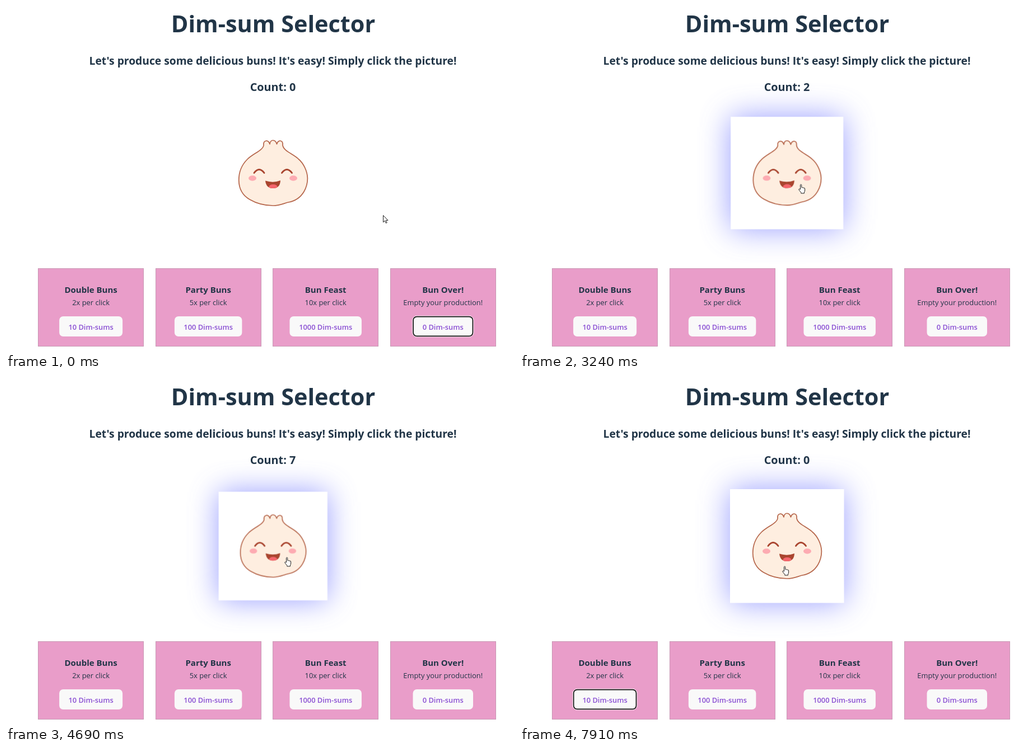
These frames come from a looping animation (907x617 px, 8000 ms). An HTML page:

```html
<!DOCTYPE html>
<html lang="en">
<head>
<meta charset="utf-8">
<title>Dim-sum Selector</title>
<style>
  html, body { margin: 0; width: 100%; height: 100%; overflow: hidden; background: #fff; }
  svg { display: block; width: 907px; height: 617px; }
  text { font-family: "Open Sans", "Noto Sans", sans-serif; font-weight: 700; fill: #213547; text-anchor: middle; }
  .title { font-size: 41.4px; }
  .lead { font-size: 19.25px; }
  .count { font-size: 19.8px; }
  .name { font-size: 15px; }
  .info { font-size: 12.9px; font-weight: 400; }
  .price { font-size: 12.85px; font-weight: 600; fill: #8a4fd3; }
  .card { fill: #e99dc9; stroke: #c898b4; shape-rendering: crispEdges; }
  .button { fill: #f9f9f9; }
  .hover { fill: none; stroke: #646cff; opacity: 0; }
  .ring { fill: none; opacity: 0; }
  .skin { fill: #feeee0; stroke: #b5654a; stroke-width: 1.7; stroke-linejoin: round; }
  .eyes { fill: none; stroke: #a9452f; stroke-width: 2.9; stroke-linecap: round; }
  .cheek { fill: #fdabb2; }
  .glow { fill: #646cff; filter: blur(28px); animation: glow 8s linear infinite; }
  .cursor { animation: move 8s linear infinite, pointer 8s step-end infinite; }
  .cursor path { fill: #fff; stroke: #111; stroke-width: .95; stroke-linejoin: round; }
  .hand { opacity: var(--hand); }
  .arrow { opacity: calc(1 - var(--hand)); }
  #card0 .hover { animation: hover 8s linear infinite; }
  #card0 .ring { animation: focus 8s step-end infinite; }
  #card3 .ring { animation: blur 8s step-end infinite; }

  @keyframes move {
    0%, 6.5% { transform: translate(673px, 374px); }
    8% { transform: translate(567px, 477px); }
    11% { transform: translate(540px, 502px); }
    13.25% { transform: translate(526px, 408px); }
    15.1% { transform: translate(513px, 284px); }
    18%, 77% { transform: translate(497px, 318px); }
    79%, 81% { transform: translate(148px, 593px); }
    84%, 87% { transform: translate(147px, 572px); }
    89%, 90% { transform: translate(156px, 568px); }
    93%, 96% { transform: translate(425px, 358px); }
    98.5%, 100% { transform: translate(468px, 334px); }
  }
  @keyframes pointer {
    0%, 78%, 90% { --hand: 0; }
    14%, 82.5%, 92%, 100% { --hand: 1; }
  }
  @keyframes glow {
    0%, 13%, 79%, 91% { opacity: 0; }
    13.2%, 77.5%, 94%, 100% { opacity: .667; }
  }
  @keyframes hover {
    0%, 80%, 91%, 100% { opacity: 0; }
    82%, 90% { opacity: 1; }
  }
  @keyframes focus { 0% { opacity: 0; } 86%, 100% { opacity: 1; } }
  @keyframes blur { 0% { opacity: 1; } 30.5%, 100% { opacity: 0; } }
</style>
</head>
<body>
<svg viewBox="0 0 907 617">
  <defs>
    <clipPath id="lips"><path id="mouth" d="M463 312.5Q477 317 490 312Q489.500 326 476.500 326Q464.500 326 463 312.500Z"/></clipPath>
  </defs>
  <text class="title" x="477" y="47">Dim-sum Selector</text>
  <text class="lead" x="476.5" y="105">Let's produce some delicious buns! It's easy! Simply click the picture!</text>
  <text class="count" id="count" x="476.5" y="152">Count: 0</text>

  <g id="picture">
    <rect class="glow" x="375" y="197" width="203.500" height="203.500"/>
    <rect x="375" y="197" width="203.500" height="203.500" fill="#fff"/>
    <path class="skin" d="M460 249C459 240 468 238 471 247C472 238 481 238 483.500 247C486 239 495 239 494 249C496 260 512 264 522 273.500C531 281 538 295 538.400 308C538.500 316 536 325 532 332C526 342 516 349 504 351C496 353 488 357 477 357C462 357 447 353 435 346C423 339 416 327 415.700 312C415.500 299 420 285 431 274C441 264 459 258 460 249Z"/>
    <path class="eyes" d="M443 298.500Q452 286.500 461 298.500M492.500 298.500Q501.500 286.500 510.500 298.500"/>
    <ellipse class="cheek" cx="440" cy="308" rx="7" ry="4.700"/>
    <ellipse class="cheek" cx="513" cy="308" rx="7" ry="4.700"/>
    <use href="#mouth" fill="#a9452f"/>
    <ellipse cx="477" cy="323.500" rx="7.500" ry="4.500" fill="#f4656c" clip-path="url(#lips)"/>
  </g>

  <g id="cards"></g>

  <g class="cursor">
    <path class="arrow" d="M.5 .5V12.700L3.300 10 5.300 14.300 7.200 13.500 5.300 9.300H9Z"/>
    <path class="hand" d="M3.500 10V1.800Q4.600 .2 5.700 1.800V6.500Q7 5.700 7.700 7Q9 6.300 9.700 7.400Q11.500 7 11.600 9V12Q11.500 14 10.400 15V17H4.800V15.500L.8 10.600Q.7 8.500 2.400 9.400Z"/>
  </g>
</svg>
<script>
const LOOP = 8000;
const RESET = 6940;
const clicks = [2510, 3240, 3480, 3820, 4010, 4180, 4520, 4760, 5080, 5810];
const count = document.getElementById("count");
const picture = document.getElementById("picture");

// name, info, price, button width
const cards = [
  ["Double Buns", "2x per click", "10 Dim-sums", 113],
  ["Party Buns", "5x per click", "100 Dim-sums", 120.5],
  ["Bun Feast", "10x per click", "1000 Dim-sums", 128.5],
  ["Bun Over!", "Empty your production!", "0 Dim-sums", 107.5]
];

function box(cls, cx, width, inset, extra = "") {
  return `<rect class="${cls}" x="${cx - width / 2 + inset}" y="${555 + inset}" width="${width - 2 * inset}"
    height="${36 - 2 * inset}" rx="${7 - inset}" ${extra}/>`;
}

document.getElementById("cards").innerHTML = cards.map(([name, info, price, width], i) => {
  const cx = 151.6 + i * 209.55;
  return `<g id="card${i}">
    <rect class="card" x="${Math.floor(cx - 94) + 0.5}" y="469.5" width="188" height="139"/>
    <text class="name" x="${cx}" y="513">${name}</text>
    <text class="info" x="${cx}" y="535">${info}</text>
    ${box("button", cx, width, 0)}
    ${box("hover", cx, width, 0.5)}
    <g class="ring">${box("", cx, width, -0.7, 'stroke="#fff"')}${box("", cx, width, 0.6, 'stroke="#111" stroke-width="1.7"')}</g>
    <text class="price" x="${cx}" y="578.5">${price}</text>
  </g>`;
}).join("");

// The picture shrinks just before each click is counted, then springs back.
const press = (t, click) => Math.max(0, 1 - Math.abs(t - click + 75) / 100);

function draw(t) {
  const total = t < RESET ? clicks.filter(click => click <= t).length : 0;
  const scale = 1 - 0.048 * Math.max(...clicks.map(click => press(t, click)));
  count.textContent = "Count: " + total;
  picture.setAttribute("transform", `translate(476.75 298.75) scale(${scale}) translate(-476.75 -298.75)`);
}

const start = performance.now();
function tick() {
  draw((performance.now() - start) % LOOP);
  requestAnimationFrame(tick);
}
tick();
</script>
</body>
</html>
```
